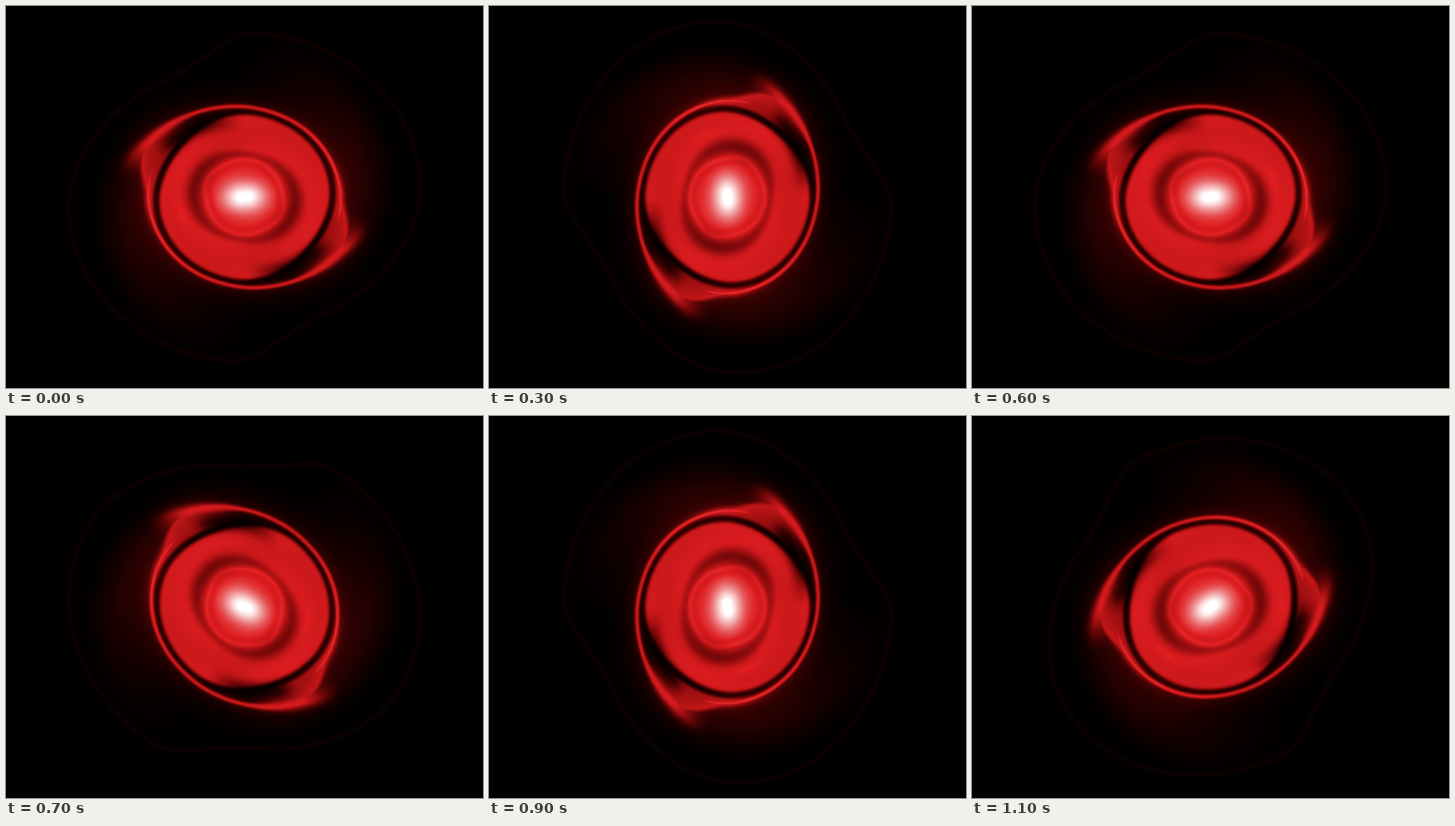
These frames come from a looping animation (640x512 px, 1.2 s). An HTML page with a canvas:

```html
<!DOCTYPE html>
<html lang="en">
<head>
<meta charset="utf-8">
<title>Rotating disk</title>
<style>
  html, body { margin: 0; width: 100%; height: 100%; overflow: hidden; background: #000; }
  canvas { display: block; }
</style>
</head>
<body>
<canvas id="stage" width="640" height="512"></canvas>
<script>
const SIZE = 512, STEP_MS = 100, STEPS = 12;
const stage = document.getElementById('stage').getContext('2d');

const clamp = (x, lo, hi) => Math.min(hi, Math.max(lo, x));
const mix = (a, b, k) => a + (b - a) * k;
const gauss = (d, s) => Math.exp(-d * d / (2 * s * s));
const smooth = (a, b, x) => {
  const k = clamp((x - a) / (b - a), 0, 1);
  return k * k * (3 - 2 * k);
};
// Signed distance between angles with half-turn symmetry
const turn = (a, b) => ((a - b + 270) % 180 + 180) % 180 - 90;
const wave = (a, peak) => Math.cos((a - peak) * Math.PI / 90);

// Catmull-Rom curve through radii given every 15 degrees
function radii(start, points, periodic) {
  const n = points.length;
  const at = i => points[periodic ? (i + n) % n : clamp(i, 0, n - 1)];
  return angle => {
    const u = (angle - start) / 15, i = Math.floor(u), t = u - i;
    const [a, b, c, d] = [at(i - 1), at(i), at(i + 1), at(i + 2)];
    return b + t * (c - a + t * (2 * a - 5 * b + 4 * c - d + t * (3 * (b - c) + d - a))) / 2;
  };
}

const armRadius = radii(15, [161, 149, 139, 130.5, 124.5, 121, 119.3, 120,
  122, 124.5, 127, 129, 129, 127, 124], false);
const gapRadius = radii(0, [117, 114, 111, 110, 111, 112.5, 113.5, 113,
  113.5, 115, 116.5, 117.5], true);
const rimRadius = radii(0, [235, 224, 209, 197, 188, 197, 218, 221,
  225, 230, 235, 237], true);

// One spiral arm: a wide soft tip that narrows to a thin line
function arm(r, t) {
  const strength = .8 * smooth(7, 30, t) * (1 - smooth(185, 214, t));
  if (!strength) return 0;
  const tip = 1 - smooth(18, 62, t), d = r - armRadius(t);
  return strength * (1 - .15 * tip) * gauss(d, 2.1 + tip * (d < 0 ? 11 : 4.5));
}

function outerRing(r, a, gap, patch) {
  const base = mix(armRadius(a + 180), armRadius(a), smooth(0, 38, a));
  const d = r - base, near = turn(a, 12);
  // Soft material between the dark gap and the overlapping arm ends
  const fill = .55 * smooth(-50, -15, near) * (1 - smooth(18, 50, near)) *
    smooth(gap + 2, gap + 9, r) * (d > 0 ? gauss(d, 4) : 1);
  const glow = .2 * Math.exp(-Math.abs(d) / (d > 0 ? 14 : 17)) * (1 - .6 * gauss(r - gap, 3));
  const arms = Math.max(arm(r, a), arm(r, a + 180));
  return Math.min(.88, Math.max(arms, fill * patch) + glow * patch);
}

function innerDisk(r, a, angle) {
  let v = .95 + .03 * Math.cos((2 * a - 5 * r + 60) * Math.PI / 180);
  const lens = wave(a, 12), lobe = .5 + .5 * lens;
  v *= 1 - (.22 + .23 * lobe) * gauss(r - 62.5 - 6 * lens, 4 + 4 * lobe);
  v += .05 * gauss(r - 87, 3) * gauss(angle - 163, 8);
  const ring = 51 + 5 * gauss(turn(a, 24), 15);
  return v + .1 * gauss(r - ring, 2.2) - .05 * gauss(r - ring + 7, 3);
}

function core(x, y, r) {
  const tilt = -.1, c = Math.cos(tilt), s = Math.sin(tilt);
  const q = ((x * c + y * s) / 30) ** 2 + ((y * c - x * s) / 21) ** 2;
  return 1.05 * Math.exp(-q) + .08 * gauss(r, 24);
}

function halo(r, a) {
  const edge = 200 - .4 * turn(a, 0);
  return .16 * (.52 + .48 * wave(a, 170)) * smooth(100, 130, r) *
    (1 - smooth(edge - 55, edge + 12, r)) + .06 * gauss(r - rimRadius(a), 2.2);
}

function brightness(x, y) {
  const r = Math.hypot(x, y);
  const angle = (Math.atan2(y, x) * 180 / Math.PI + 360) % 360, a = angle % 180;
  if (r > 250) return 0;
  const gap = gapRadius(a);
  const inside = 1 / (1 + Math.exp((r - gap + 3) / 1.3));
  const patch = 1 - .82 * smooth(24, 40, a) * (1 - smooth(52, 92, a)) *
    gauss(r - 124 + .45 * (a - 32), 8.5);
  let v = halo(r, a);
  if (inside > .001) v += inside * patch * innerDisk(r, a, angle);
  if (r > 95) v += (1 - inside) * outerRing(r, a, gap, patch);
  if (r < 90) v += core(x, y, r);
  return v;
}

function paintDisk() {
  const disk = document.createElement('canvas');
  disk.width = disk.height = SIZE;
  const ctx = disk.getContext('2d'), image = ctx.createImageData(SIZE, SIZE);
  for (let i = 0; i < SIZE * SIZE; i++) {
    const x = i % SIZE + .5 - SIZE / 2, y = Math.floor(i / SIZE) + .5 - SIZE / 2;
    const v = brightness(x, y), red = Math.min(v, 1), white = clamp(v - 1, 0, 1);
    image.data.set([
      mix(222 * red, 255, white),
      mix(29 * red * red, 255, white),
      mix(32 * red * red, 255, white),
      255
    ], i * 4);
  }
  ctx.putImageData(image, 0, 0);
  return disk;
}

const disk = paintDisk();
stage.imageSmoothingQuality = 'high';

function frame() {
  const step = Math.floor(performance.now() / STEP_MS) % STEPS;
  stage.setTransform(1, 0, 0, 1, 0, 0);
  stage.fillRect(0, 0, 640, 512);
  stage.translate(320, 256);
  stage.rotate(step * 2 * Math.PI / STEPS);
  stage.drawImage(disk, -SIZE / 2, -SIZE / 2);
  requestAnimationFrame(frame);
}
frame();
</script>
</body>
</html>
```
